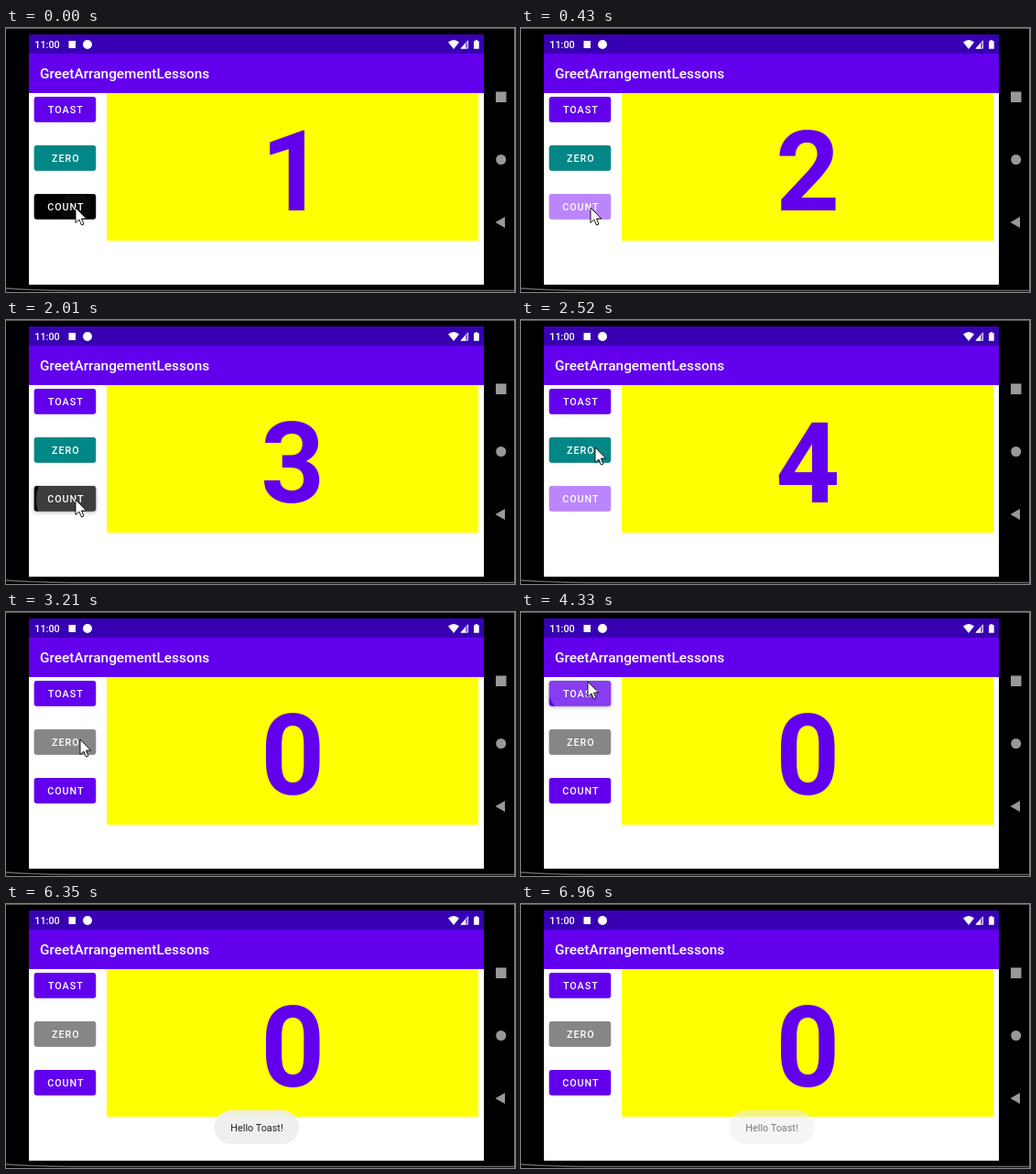
An HTML page that plays this animation: 556 by 288 pixels, repeating every 7.06 s.

```html
<!DOCTYPE html>
<html lang="en">
<head>
<meta charset="utf-8">
<title>Counter app</title>
<style>
html, body { margin: 0; width: 100%; height: 100%; overflow: hidden; background: #000; }
svg { display: block; width: 556px; height: 288px; font-family: Roboto, sans-serif; }
.btn text { font: 500 10.75px Roboto, sans-serif; letter-spacing: .0893em; fill: #fff; text-anchor: middle; }
</style>
</head>
<body>
<svg viewBox="0 0 556 288">
  <!-- device -->
  <rect width="556" height="288" fill="#000"/>
  <path d="M0 .5H556" stroke="#555"/>
  <path d="M555.500 0V288" stroke="#777"/>
  <path d="M0 284Q30 286 70 286.500H556" fill="none" stroke="#666" stroke-width="1.500"/>
  <g fill="#999">
    <rect x="535" y="69.500" width="11.500" height="11.500"/>
    <circle cx="540.700" cy="143.500" r="5.500"/>
    <path d="M534.500 212L545 206V218Z"/>
  </g>

  <!-- screen -->
  <rect x="25" y="7" width="497" height="273" fill="#fff"/>
  <rect x="25" y="7" width="497" height="21" fill="#3700b3"/>
  <rect x="25" y="28" width="497" height="43" fill="#6200ee"/>
  <g fill="#fff">
    <text x="31.300" y="22" font-size="10.800" font-weight="500">11:00</text>
    <rect x="68.500" y="14" width="7.500" height="8"/>
    <circle cx="89" cy="18" r="5"/>
    <path d="M483 15.500Q489 10.500 495 15.500L489 23Z"/>
    <path d="M502 16.400V22.500H496.500Z"/>
    <path d="M504.600 13.800V22.200H497.200Z" fill-opacity=".4" stroke="#fff" stroke-width=".8"/>
    <path d="M511 14.200H512.700V13H515V14.200H516.700V22.700H511Z"/>
    <text x="37" y="55" font-size="15.400" font-weight="500">GreetArrangementLessons</text>
  </g>
  <rect x="110" y="71" width="406" height="161" fill="#ff0"/>
  <text id="count" x="313.300" y="199" font-size="122" font-weight="700" fill="#6200ee" text-anchor="middle"></text>

  <g id="buttons"></g>

  <g id="toast">
    <rect x="227.500" y="225" width="92.500" height="37" rx="18.500" fill="#eee" fill-opacity=".93"/>
    <text x="274" y="247.800" font-size="10.850" fill="#222" text-anchor="middle">Hello Toast!</text>
  </g>
  <path id="cursor" d="M0 0V16.500L3.900 13L6.500 19L9 18L6.500 12H11.700Z" fill="#fff" stroke="#000" stroke-width=".9"/>
</svg>
<script>
const LOOP = 7060;
const PURPLE = '#6200ee';
const $ = id => document.getElementById(id);
const clamp = v => Math.max(0, Math.min(1, v));

const buttons = [
  { label: 'TOAST', touch: [73, 76], color: () => PURPLE },
  { label: 'ZERO', touch: [81, 139], color: n => n ? '#018786' : '#868686' },
  { label: 'COUNT', touch: [76, 196], color: n => n === 0 ? PURPLE : n % 2 ? '#000' : '#bb86fc' }
];
const [toast, zero, count] = buttons;

// r0 is the ripple radius first seen
const taps = [
  { on: count, down: 0, up: 280, done: 430, r0: 17 },
  { on: count, down: 1280, up: 1430, done: 1580, r0: 80 },
  { on: count, down: 2010, up: 2280, done: 2400, r0: 43 },
  { on: zero, down: 2940, up: 3090, done: 3210, r0: 80 },
  { on: toast, down: 4330, up: 4480, done: 4760, r0: 45 }
];

const moves = [
  { from: 2500, to: 2520, x: 81, y: 139 },
  { from: 3600, to: 3930, x: 73, y: 76 },
  { from: 5660, to: 5800, x: 302, y: 224 },
  { from: 5880, to: 5920, x: 210, y: 213 },
  { from: 6200, to: 6230, x: 210, y: 199 }
];
const POINTER_GONE = 6350;

$('buttons').innerHTML = buttons.map((b, i) => {
  const y = 75 + 53 * i;
  const box = `<rect x="30.700" y="${y}" width="67.500" height="27.700" rx="3"/>`;
  return `<g class="btn"><clipPath id="clip${i}">${box}</clipPath>${box}
    <circle cx="${b.touch[0]}" cy="${b.touch[1]}" fill="#fff" clip-path="url(#clip${i})"/>
    <text x="65.300" y="${y + 18}">${b.label}</text></g>`;
}).join('');

buttons.forEach((b, i) => [, b.face, b.wave] = $('buttons').children[i].children);

function numberAt(t) {
  let n = 1;
  for (const tap of taps) {
    if (t < tap.up) break;
    if (tap.on === count) n++;
    if (tap.on === zero) n = 0;
  }
  return n;
}

function pointerAt(t) {
  let x = 76, y = 196;
  for (const m of moves) {
    const p = clamp((t - m.from) / (m.to - m.from)) ** .35;
    x += (m.x - x) * p;
    y += (m.y - y) * p;
  }
  return [x, y];
}

function drawButton(b, n, t) {
  const tap = taps.find(k => k.on === b && t >= k.down && t < k.done);
  let radius = 0, glow = 0;
  if (tap) {
    radius = tap.r0 + 45 * ((t - tap.down) / 130) ** 2;
    glow = .24 * clamp((radius / 43) ** 2) * (t < tap.up ? 1 : .5);
  }
  b.face.setAttribute('fill', b.color(n));
  b.face.style.filter = glow > .15
    ? 'drop-shadow(0 1.5px 2px rgba(0,0,0,.3))'
    : 'drop-shadow(0 .5px .5px rgba(0,0,0,.25))';
  b.wave.setAttribute('r', radius);
  b.wave.setAttribute('opacity', glow);
}

function draw(t) {
  const n = numberAt(t);
  $('count').textContent = n;
  buttons.forEach(b => drawButton(b, n, t));
  $('toast').setAttribute('opacity', t < 5160 ? 0 : clamp(Math.min((t - 5120) / 400, (7230 - t) / 450)));
  $('cursor').setAttribute('transform', `translate(${pointerAt(t)})`);
  $('cursor').setAttribute('visibility', t < POINTER_GONE ? 'visible' : 'hidden');
}

const start = performance.now();
function tick() {
  draw((performance.now() - start) % LOOP);
  requestAnimationFrame(tick);
}
tick();
</script>
</body>
</html>
```
